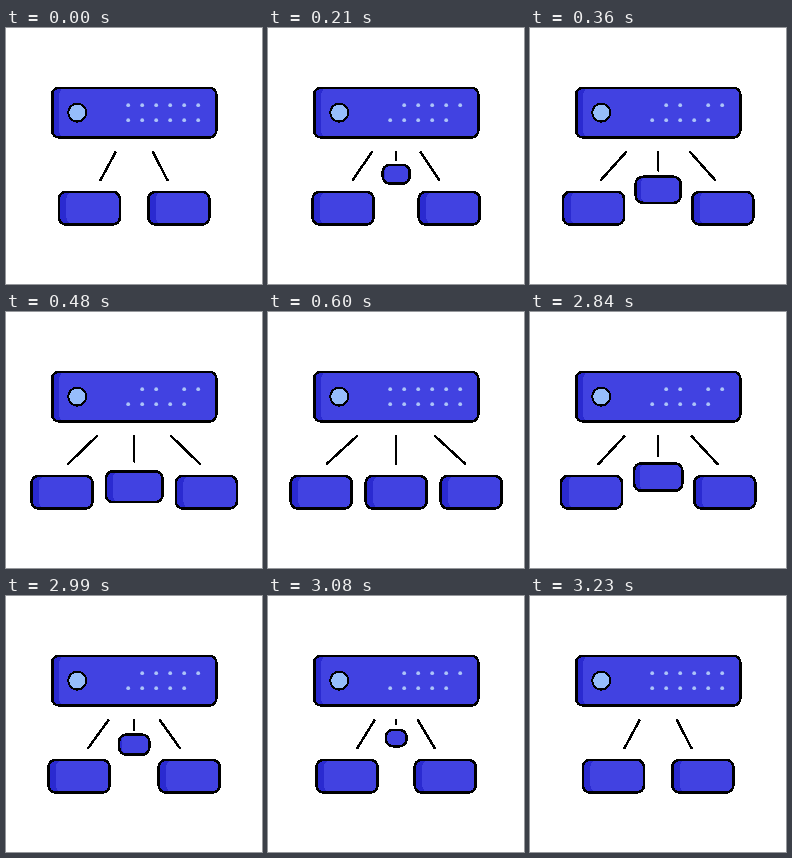
Write an HTML page that moves like this. It is 256 px wide and 256 px high and loops after 4260 ms.

```html
<!DOCTYPE html>
<html lang="en">
<head>
<meta charset="utf-8">
<title>Server scaling</title>
<style>
  html, body { margin: 0; width: 100%; height: 100%; overflow: hidden; background: #fff; }
  svg { display: block; width: 100%; height: 100%; shape-rendering: crispEdges; }
</style>
</head>
<body>
<svg id="stage" viewBox="0 0 256 256"></svg>
<script>
const LOOP = 4260, MOVE = 600, CLOSE_AT = 2630, BLINK_DELAY = 45;
const BODY = '#4142e1', SHADE = '#2a2ad0', INK = '#000';
const stage = document.getElementById('stage');

function set(node, attrs) {
  for (const key in attrs) node.setAttribute(key, attrs[key]);
  return node;
}

function add(tag, attrs, parent = stage) {
  const node = document.createElementNS('http://www.w3.org/2000/svg', tag);
  return parent.appendChild(set(node, attrs));
}

// Rounded box with a darker band along its left side.
function makeBox() {
  const group = add('g', {});
  const back = add('rect', { fill: SHADE }, group);
  const front = add('rect', { fill: BODY }, group);
  const edge = add('rect', { fill: 'none', stroke: INK, 'stroke-width': 2.6 }, group);
  return {
    group,
    place(cx, cy, width, height, radius, band) {
      const x = cx - width / 2, y = cy - height / 2;
      const rx = Math.min(radius, height / 2);
      set(back, { x, y, width, height, rx });
      set(front, { x: x + band, y, width: width - band, height, rx });
      set(edge, { x, y, width, height, rx });
    }
  };
}

const makeLine = () =>
  add('line', { stroke: INK, 'stroke-width': 2.5, 'stroke-linecap': 'round' });

const server = makeBox();
server.place(128.2, 84.6, 164, 49.6, 6.5, 7);
add('circle', { cx: 71.2, cy: 84.6, r: 9, fill: '#96bdfb', stroke: INK, 'stroke-width': 2.1 });

const dots = [];
for (const cy of [77.2, 92.2])
  for (let i = 0; i < 6; i++)
    dots.push(add('circle', {
      cx: 122.2 + i * 14, cy, r: 1.9, fill: '#adc4f8', 'shape-rendering': 'geometricPrecision'
    }));

const [leftLine, midLine, rightLine] = [makeLine(), makeLine(), makeLine()];
const [leftBox, midBox, rightBox] = [makeBox(), makeBox(), makeBox()];

const mix = (a, b, p) => a + (b - a) * p;
const clamp = v => Math.max(0, Math.min(1, v));
const show = (node, on) => set(node, { visibility: on ? 'visible' : 'hidden' });

function draw(time) {
  const t = time % LOOP;
  const closing = t >= CLOSE_AT;
  const local = closing ? t - CLOSE_AT : t;
  const step = clamp(local / MOVE);
  const u = closing ? 1 - step : step;
  const p = (1 - Math.cos(Math.PI * u)) / 2;
  const q = 1 - p;

  leftBox.place(mix(83.4, 53.2, p), 180.2, 61, 32.6, 7, 7.5);
  rightBox.place(mix(172.8, 203.2, p), 180.2, 61, 32.6, 7, 7.5);
  midBox.place(128.2, 180.2 - 59.7 * q + 17.7 * q * q,
    mix(14, 61, p), mix(13.5, 32.6, p), 7, 7.5 * p);
  set(midBox.group, { opacity: clamp(p * 12) });

  set(leftLine, { x1: mix(109.5, 88.8, p), y1: 124.2, x2: mix(94.6, 58.6, p), y2: 152 });
  set(rightLine, { x1: mix(147, 167.2, p), y1: 124.2, x2: mix(161.4, 197.4, p), y2: 152 });
  set(midLine, { x1: 128.2, y1: 124.2, x2: 128.2, y2: mix(124.2, 152, p) });
  show(midLine, p > 0.005);

  const blinking = local > BLINK_DELAY && local < MOVE;
  show(dots[0], !blinking);
  show(dots[3], !(blinking && u > 0.5));
  show(dots[11], !blinking);
}

const start = performance.now();
function tick() {
  draw(performance.now() - start);
  requestAnimationFrame(tick);
}
tick();
</script>
</body>
</html>
```
